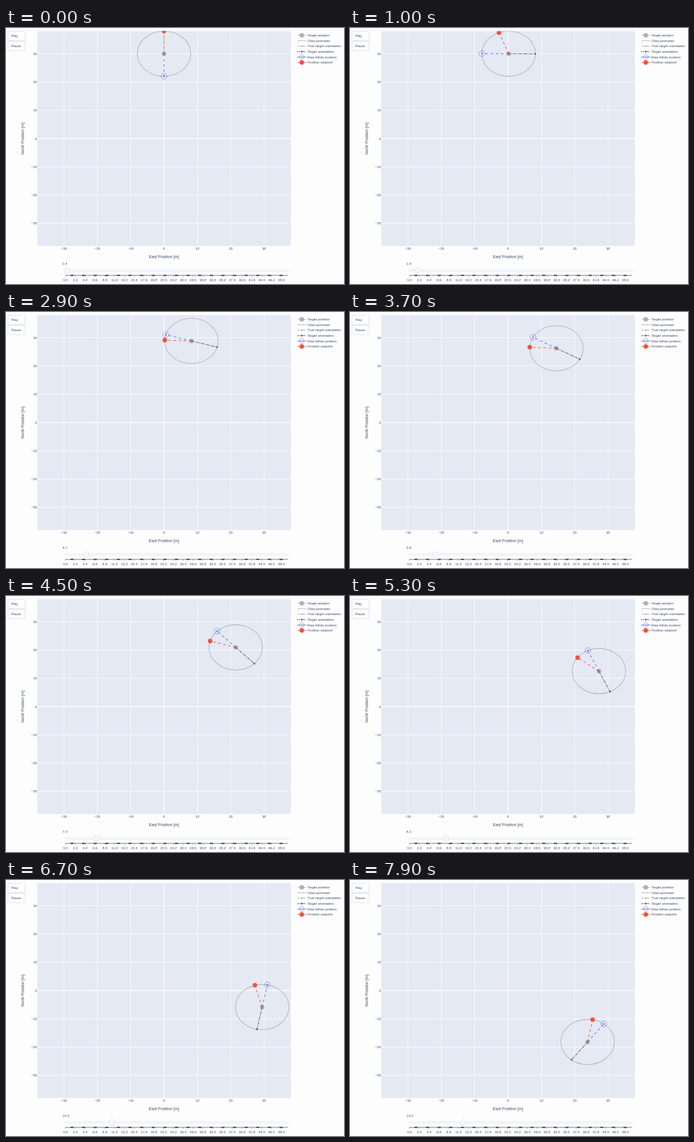
Write an HTML page that moves like this. It is 600 px wide and 455 px high and loops after 8 s.

```html
<!DOCTYPE html>
<html lang="en">
<head>
<meta charset="utf-8">
<title>Follow target orbit</title>
<style>
html, body { margin: 0; width: 100%; height: 100%; overflow: hidden; background: #fdfdfe; }
svg { display: block; width: 600px; height: 455px; }
text { font: 6.1px "Liberation Sans", Arial, sans-serif; fill: #3a465f; }
.title { font-size: 7.15px; }
.mid { text-anchor: middle; }
.end { text-anchor: end; }
.grid { stroke: #fff; stroke-width: .8; }
.zero { stroke: #fff; stroke-width: 1.3; }
.button { fill: #fefefe; stroke: #c3cbd9; stroke-width: .6; }
.orbit { fill: none; stroke: #b2b1ba; stroke-width: 1.1; }
.line { fill: none; stroke-width: 1.05; }
.dash { stroke-dasharray: 4.6 4.6; }
.dashdot { stroke-dasharray: 4.6 1.53 1.53 1.53; }
.ring { fill: none; stroke: #7d84ee; stroke-width: .8; }
.rail { fill: #f7f8fb; stroke: #dfe3ea; stroke-width: .6; }
.knob { fill: #f6f7fa; stroke: #d3d8e1; stroke-width: .7; }
</style>
</head>
<body>
<svg id="stage" viewBox="0 0 600 455">
  <defs><clipPath id="clip"><rect x="55.5" y="5.5" width="450" height="382"/></clipPath></defs>
</svg>
<script>
const stage = document.getElementById('stage');
const GREY = '#b3aeb3', DARK = '#4a4a52', BLUE = '#636bdc', RED = '#ef5340';
const SX = 225 / 38, SY = 191 / 38, ORBIT = 8, PATH = 30;
const px = x => 280.5 + x * SX;
const py = y => 196.5 - y * SY;

function set(node, attrs) {
  for (const key in attrs) node.setAttribute(key, attrs[key]);
  return node;
}
function add(tag, attrs, parent = stage) {
  const node = document.createElementNS('http://www.w3.org/2000/svg', tag);
  return parent.appendChild(set(node, attrs));
}
function text(str, x, y, cls = '', extra = {}) {
  const node = add('text', { x, y, class: cls, ...extra });
  node.textContent = str;
  return node;
}
const line = (x1, y1, x2, y2, attrs, parent) => add('line', { x1, y1, x2, y2, ...attrs }, parent);
const dot = (cx, cy, r, attrs, parent) => add('circle', { cx, cy, r, ...attrs }, parent);
const label = n => String(n).replace('-', '\u2212');

// Axes
add('rect', { x: 55.5, y: 5.5, width: 450, height: 382, fill: '#e4e9f3' });
for (let v = -30; v <= 30; v += 10) {
  const cls = v ? 'grid' : 'zero';
  line(px(v), 5.5, px(v), 387.5, { class: cls });
  line(55.5, py(v), 505.5, py(v), { class: cls });
  text(label(v), px(v), 394.2, 'mid');
  text(label(v), 55, py(v) + 2.1, 'end');
}
text('East Position [m]', 280.5, 408.8, 'title mid');
text('North Position [m]', 0, 0, 'title mid', { transform: 'translate(32 196.5) rotate(-90)' });

// Buttons
[['Play', 6], ['Pause', 23.7]].forEach(([name, y]) => {
  add('rect', { x: 3.5, y, width: 30.5, height: 16.6, rx: 1, class: 'button' });
  text(name, 9.4, y + 10.3);
});

// Legend
const legend = [
  ['Target position', GREY, '', 4],
  ['Orbit perimeter', GREY, '', 0],
  ['True target orientation', GREY, 'dashdot', 1.4],
  ['Target orientation', DARK, 'dashdot', 1.4],
  ['Raw follow position', BLUE, '', 1],
  ['Position setpoint', RED, '', 4]
];
legend.forEach(([name, color, style, r], i) => {
  const y = 13.1 + i * 9.64;
  line(517.3, y, 532.8, y, { class: 'line ' + style, stroke: color });
  if (r) dot(525, y, r, { fill: color });
  if (color === BLUE) dot(525, y, 4.3, { class: 'ring' });
  text(name, 535, y + 2.1);
});

// Slider
add('rect', { x: 104.3, y: 429.4, width: 397.5, height: 3, rx: 1.5, class: 'rail' });
line(105.5, 439.7, 500.5, 439.7, { stroke: '#a3a5a9', 'stroke-width': 1.7 });
for (let i = 0; i < 19; i++) {
  const x = 114.3 + i * 20.62;
  line(x, 439.7, x + 5.6, 439.7, { stroke: '#2c2c30', 'stroke-width': 1.8 });
}
for (let i = 0; i < 23; i++) {
  const x = 105.7 + i * 17.41;
  line(x, 439, x, 442.6, { stroke: '#777b82', 'stroke-width': .6 });
  text((i * 2.2).toFixed(1), x, 450.2, 'mid');
}
const knob = dot(108, 431, 5.2, { class: 'knob' });
const clock = text('0.4', 100.3, 420.6);

// Traces
const plot = add('g', { 'clip-path': 'url(#clip)' });
const body = dot(0, 0, 4, { fill: GREY }, plot);
const orbit = add('ellipse', { rx: ORBIT * SX, ry: ORBIT * SY, class: 'orbit' }, plot);

function trace(color, style, r) {
  return {
    line: line(0, 0, 0, 0, { class: 'line ' + style, stroke: color }, plot),
    hub: dot(0, 0, 1.3, { fill: color }, plot),
    tip: dot(0, 0, r, { fill: color }, plot)
  };
}
const heading = trace(DARK, 'dashdot', 1.4);
const follow = trace(BLUE, 'dash', 1.4);
const ring = dot(0, 0, 5.1, { class: 'ring' }, plot);
const setpoint = trace(RED, 'dash', 4);
set(setpoint.hub, { 'fill-opacity': .6 });

function aim(tr, x, y, bearing) {
  const a = bearing * Math.PI / 180;
  const tx = px(x + ORBIT * Math.sin(a)), ty = py(y + ORBIT * Math.cos(a));
  set(tr.line, { x1: px(x), y1: py(y), x2: tx, y2: ty });
  set(tr.hub, { cx: px(x), cy: py(y) });
  set(tr.tip, { cx: tx, cy: ty });
  return { cx: tx, cy: ty };
}

// Playback ms -> simulated seconds
const pace = [[0, .4], [1800, 3.1], [2900, 4.7], [4500, 7], [6100, 9.4], [6700, 10.4], [7900, 12]];
// Seconds, setpoint bearing, bearing rate
const swing = [[.4, 0, 0], [3.1, -54.2, -28], [4.7, -87.9, -8], [7, -73.5, 14.5],
  [9.4, -31.7, 17], [10.4, -15.8, 16.4], [12, 10.8, 16.4]];

function span(keys, t) {
  let i = 0;
  while (i < keys.length - 2 && t >= keys[i + 1][0]) i++;
  const a = keys[i], b = keys[i + 1];
  return { a, b, d: b[0] - a[0], u: (t - a[0]) / (b[0] - a[0]) };
}
function linear(keys, t) {
  const { a, b, u } = span(keys, t);
  return a[1] + (b[1] - a[1]) * u;
}
function hermite(keys, t) {
  const { a, b, d, u } = span(keys, t), v = 1 - u;
  return a[1] * v * v * (1 + 2 * u) + b[1] * u * u * (3 - 2 * u) +
    d * u * v * (a[2] * v - b[2] * u);
}

// Constant acceleration from rest, then constant speed
const START = 1.4, CRUISE = 7, ACCEL = 2.92, SPEED = 16.3;
function travelled(t) {
  const run = Math.max(0, Math.min(t, CRUISE) - START);
  return ACCEL * run * run / 2 + SPEED * Math.max(0, t - CRUISE);
}

function draw(ms) {
  const t = linear(pace, ms), deg = travelled(t), rad = deg * Math.PI / 180;
  const x = PATH * Math.sin(rad), y = PATH * Math.cos(rad);
  const course = t > START ? 90 + deg : 0;
  const center = { cx: px(x), cy: py(y) };
  set(body, center);
  set(orbit, center);
  aim(heading, x, y, course);
  set(ring, aim(follow, x, y, course + 180));
  aim(setpoint, x, y, hermite(swing, t));
  set(knob, { cx: 105 + t * 7.94 });
  clock.textContent = t.toFixed(1);
}

const began = performance.now();
function tick() {
  const ms = Math.max(0, performance.now() - began) % 8000;
  draw(Math.floor(ms / 100) * 100);
  requestAnimationFrame(tick);
}
draw(0);
requestAnimationFrame(tick);
</script>
</body>
</html>
```
